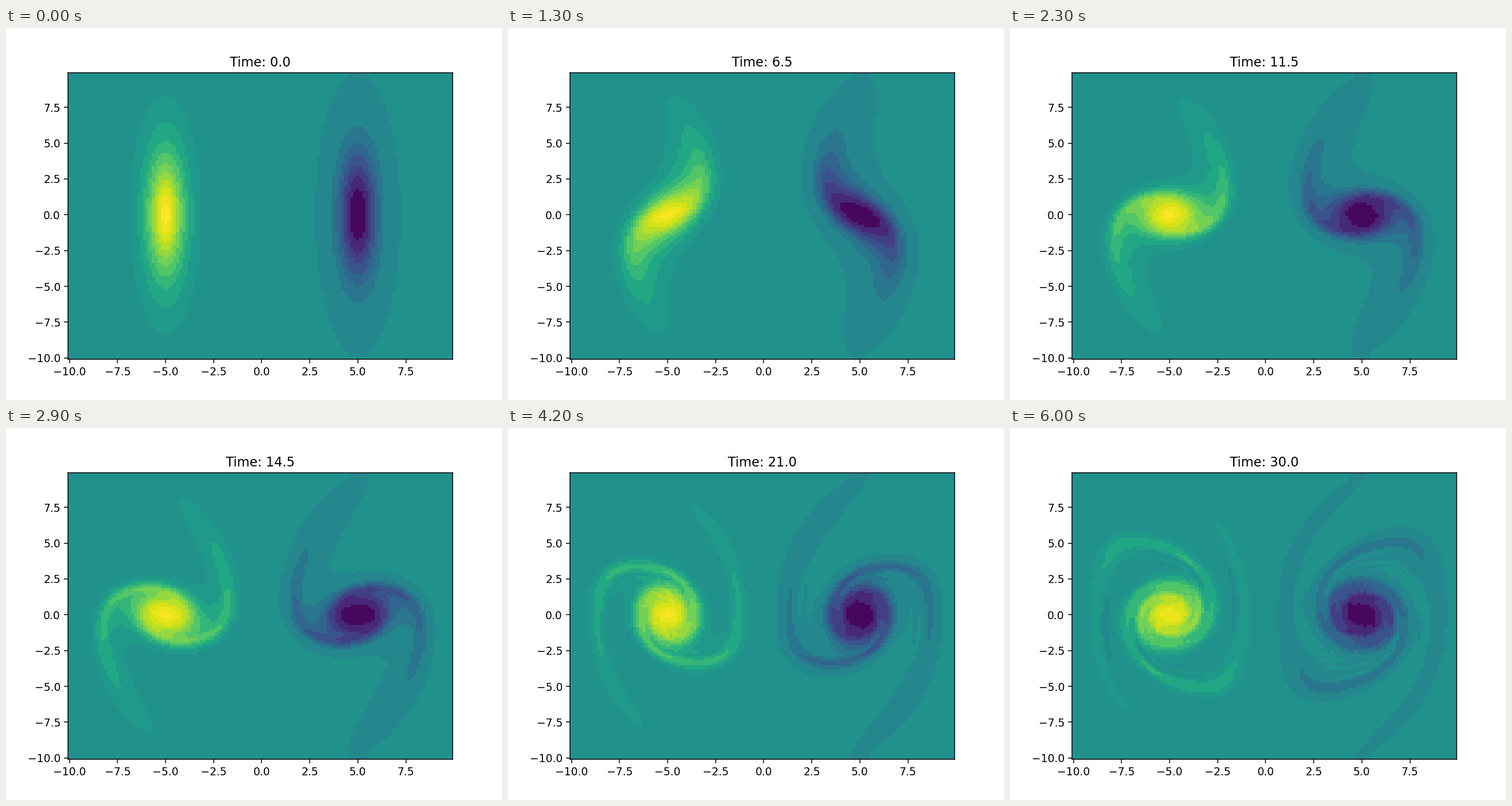
Animation of 864 by 648 pixels, one loop 6.1 s. Source, as a matplotlib script:

```python
import numpy as np
import matplotlib.pyplot as plt
from matplotlib.animation import FuncAnimation
from matplotlib.colors import BoundaryNorm, ListedColormap

N, HALF, NU = 128, 10.0, 0.001
FRAMES, FRAME_TIME, SUBSTEPS = 61, 0.5, 5
DX = 2 * HALF / N
DT = FRAME_TIME / SUBSTEPS

x = -HALF + DX * np.arange(N)
X, Y = np.meshgrid(x, x)

kx = 2 * np.pi * np.fft.rfftfreq(N, DX)
ky = 2 * np.pi * np.fft.fftfreq(N, DX)
K2 = kx[None, :] ** 2 + ky[:, None] ** 2
K2[0, 0] = 1e-12


def diff(f, axis):
    """Periodic central difference."""
    return (np.roll(f, -1, axis) - np.roll(f, 1, axis)) / (2 * DX)


def laplacian(f):
    around = sum(np.roll(f, s, a) for s in (1, -1) for a in (0, 1))
    return (around - 4 * f) / DX ** 2


def rate(w):
    """Vorticity transport, with the stream function solved by FFT."""
    psi = np.fft.irfft2(-np.fft.rfft2(w) / K2, s=w.shape)
    advection = diff(psi, 1) * diff(w, 0) - diff(psi, 0) * diff(w, 1)
    return NU * laplacian(w) + advection


def rk4_step(w):
    a = rate(w)
    b = rate(w + DT / 2 * a)
    c = rate(w + DT / 2 * b)
    d = rate(w + DT * c)
    return w + DT / 6 * (a + 2 * b + 2 * c + d)


def vortex(cx):
    return np.exp(-(X - cx) ** 2 - Y ** 2 / 20)


def simulate():
    w = vortex(-5) - vortex(5)
    states = [w]
    for _ in range(FRAMES - 1):
        for _ in range(SUBSTEPS):
            w = rk4_step(w)
        states.append(w)
    return states


def banded_colors():
    """Viridis reduced to flat bands, with the middle one at zero."""
    bounds = np.array([
        -1, -0.85, -0.70, -0.56, -0.42, -0.282, -0.143, -0.007,
        0.03, 0.125, 0.26, 0.39, 0.52, 0.634, 0.739, 0.835, 0.915, 0.97, 1])
    mids = (bounds[:-1] + bounds[1:]) / 2
    mids[np.abs(mids) < 0.02] = 0
    mids[0] = -0.96
    cmap = ListedColormap(plt.get_cmap("viridis")((mids + 1) / 2))
    return cmap, BoundaryNorm(bounds, cmap.N)


states = simulate()
cmap, norm = banded_colors()

plt.rcParams["font.family"] = "DejaVu Sans"
fig, ax = plt.subplots(figsize=(6.4, 4.8), dpi=135)
mesh = ax.pcolormesh(x, x, states[0], cmap=cmap, norm=norm, shading="nearest")
title = ax.set_title("Time: 0.0")


def update(i):
    mesh.set_array(states[i])
    title.set_text(f"Time: {i * FRAME_TIME:.1f}")
    return mesh, title


anim = FuncAnimation(fig, update, frames=FRAMES, interval=100,
                     repeat=True, repeat_delay=0, blit=False)
plt.show()
```
